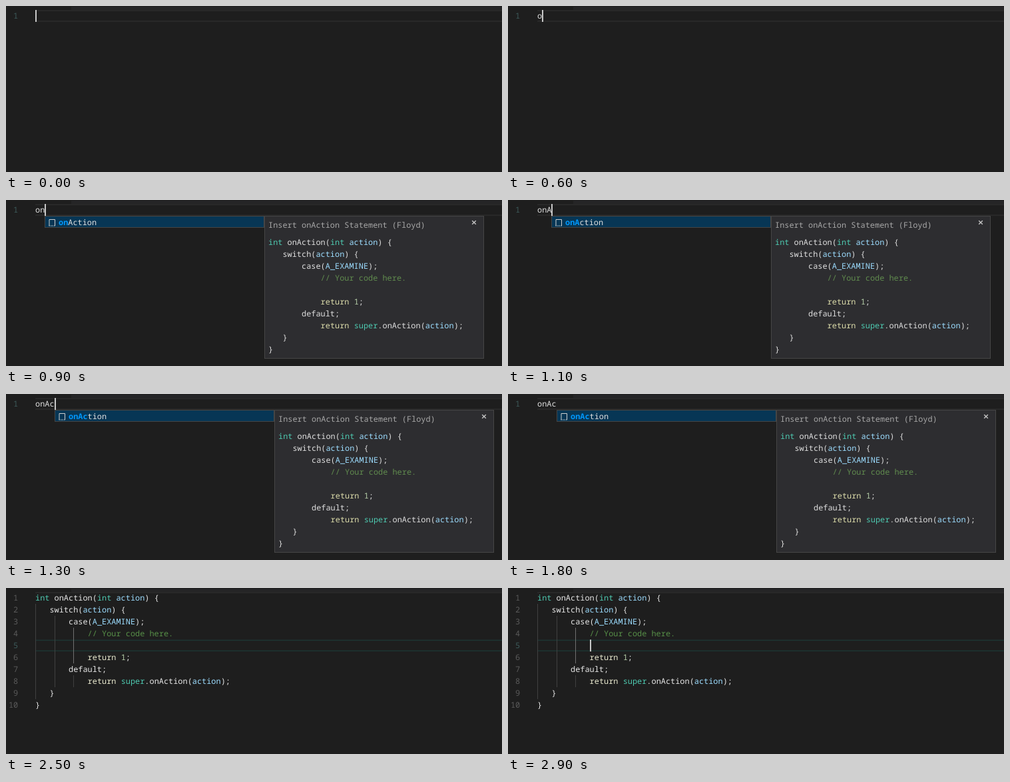
An HTML page for the animation above (3.4 s loop, 745x251 px).

```html
<!DOCTYPE html>
<html lang="en">
<head>
<meta charset="utf-8">
<title>Snippet completion</title>
<style>
html, body { margin: 0; width: 100%; height: 100%; overflow: hidden; background: #1e1e1e; }
svg { display: block; width: 745px; height: 251px; }
text {
  font: 11.91px "Noto Sans Mono", "DejaVu Sans Mono", monospace;
  white-space: pre; text-rendering: geometricPrecision; fill: #dedede;
}
.editor text { fill: #e6e6e6; }
.editor .number { fill: #5a5a5a; text-anchor: end; }
.editor .active { fill: #3d5a5a; }
.editor .typed { fill: #dcebf3; }
.type { fill: #4ec9b0; }
.name { fill: #9cdcfe; }
.flow { fill: #dcdcaa; }
.editor .flow { fill: #e9e9cf; }
.digit { fill: #b5cea8; }
.comment { fill: #608b4e; }
.editor .comment { fill: #578f48; }
.match { fill: #0097fb; font-weight: bold; }
.popup .title { fill: #a6a6a6; }
</style>
</head>
<body>
<svg id="stage" viewBox="0 0 745 251"></svg>
<script>
const LOOP = 3400, LEFT = 44, TOP = 6, LINE = 18, CHAR = 7.147;
const WORD = 'onAction';
const CODE = [
  'int onAction(int action) {',
  '   switch(action) {',
  '       case(A_EXAMINE);',
  '           // Your code here.',
  '',
  '           return 1;',
  '       default;',
  '           return super.onAction(action);',
  '   }',
  '}'
];
const TOKENS = /(?<type>\b(?:int|super)\b)|(?<name>\b(?:action|A_EXAMINE)\b)|(?<flow>\breturn\b)|(?<digit>\b\d\b)|(?<comment>\/\/.*)/g;

let css = '', timelines = 0;

// Shows the content only within the given [from, to] spans in ms.
function during(spans, content) {
  const id = 'show' + timelines++;
  const percent = ms => (Math.floor(ms / LOOP * 10000) / 100) + '%';
  let frames = spans[0][0] > 0 ? '0% { opacity: 0 }' : '';
  for (const [from, to] of spans) {
    frames += `${percent(from)} { opacity: 1 }`;
    frames += `${percent(to)} { opacity: ${to === LOOP ? 1 : 0} }`;
  }
  css += `@keyframes ${id} { ${frames} } .${id} { animation: ${id} ${LOOP}ms step-end infinite; }`;
  return `<g class="${id}">${content}</g>`;
}

const rect = (x, y, w, h, fill, extra = '') =>
  `<rect x="${x}" y="${y}" width="${w}" height="${h}" fill="${fill}" ${extra}/>`;
const text = (x, y, content, cls = '') => `<text x="${x}" y="${y}" class="${cls}">${content}</text>`;
const cursor = (x, y) => rect(x, y, 2, LINE, '#c8c8c8');
const column = n => Math.round(LEFT + CHAR * n);

function highlight(line) {
  return line.replace(TOKENS, (word, ...rest) => {
    const kinds = rest[rest.length - 1];
    const kind = Object.keys(kinds).find(k => kinds[k]);
    return `<tspan class="${kind}">${word}</tspan>`;
  });
}

const codeBlock = (x, baseline) =>
  CODE.map((line, i) => text(x, baseline + i * LINE, highlight(line))).join('');

const lineNumber = (n, active) =>
  text(18.2, TOP + 13 + (n - 1) * LINE, n, active ? 'number active' : 'number');

function popup(typed) {
  const border = 'stroke="#454545"';
  return `<g class="popup" transform="translate(${column(typed)} 0)">`
    + rect(.5, 24.5, 329, 17, '#073655', border)
    + '<path d="M7 39V29.5H15.5V39" fill="none" stroke="#d0d0d0"/>'
    + '<path d="M6.5 39H16" stroke="#d0d0d0" stroke-dasharray="1.5 1"/>'
    + text(21, 38, `<tspan class="match">${WORD.slice(0, typed)}</tspan>${WORD.slice(typed)}`)
    + rect(330.5, 24.5, 329, 215, '#2d2d30', border)
    + text(336, 42, 'Insert onAction Statement (Floyd)', 'title')
    + '<path d="M642.2 31.2l5.6 5.6m0-5.6l-5.6 5.6" stroke="#c5c5c5" stroke-width="1.4"/>'
    + codeBlock(336, 68)
    + '</g>';
}

function typing(count, from, to, popupFrom = from, cursorTo = to) {
  return during([[from, to]], text(LEFT, TOP + 13, WORD.slice(0, count), 'typed'))
    + during([[popupFrom, to]], popup(count))
    + during([[from, cursorTo]], cursor(column(count), TOP));
}

function guide(level, firstLine, lastLine, color = '#404040') {
  const x = column([0, 4, 8][level]);
  return rect(x, TOP + (firstLine - 1) * LINE, 1, (lastLine - firstLine + 1) * LINE, color);
}

const frame =
  rect(98, 1, 647, 5, '#252526') + rect(LEFT, 6, 701, 2, '#282828');

const emptyFile = rect(LEFT, 22, 701, 2, '#282828') + lineNumber(1, true);

const filledFile =
  rect(LEFT, 78, 701, 2, '#1d2f2d') + rect(LEFT, 94, 701, 2, '#1d2f2d')
  + guide(0, 2, 9) + guide(1, 3, 8) + guide(2, 4, 6, '#707070') + guide(2, 8, 8)
  + CODE.map((_, i) => lineNumber(i + 1, i === 4)).join('')
  + codeBlock(LEFT, TOP + 13);

const scene = `<g class="editor">${frame}`
  + during([[0, 2000]], emptyFile)
  + during([[2000, LOOP]], filledFile)
  + '</g>'
  + during([[0, 400]], cursor(LEFT, TOP))
  + typing(1, 600, 900, 700)
  + typing(2, 900, 1100)
  + typing(3, 1100, 1300)
  + typing(4, 1300, 2000, 1300, 1800)
  + during([[2000, 2500], [2900, LOOP]], cursor(123, 78));

const style = document.createElement('style');
style.textContent = css;
document.head.append(style);
document.getElementById('stage').innerHTML = scene;
</script>
</body>
</html>
```
